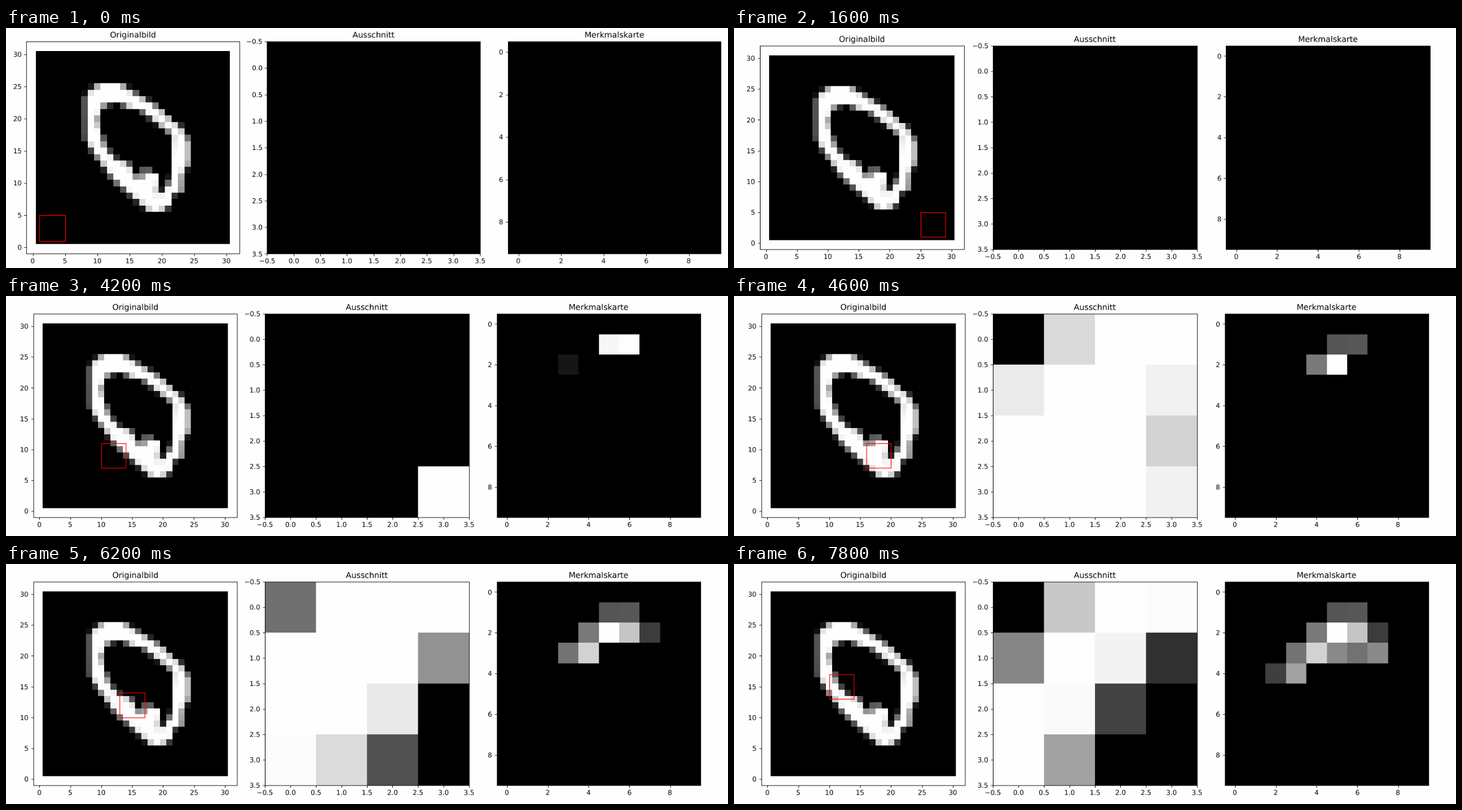
These frames come from a looping animation (1280x427 px, 8 s). An HTML page with a canvas:

```html
<!DOCTYPE html>
<html lang="de">
<head>
<meta charset="utf-8">
<title>Faltung</title>
<style>
html, body { margin: 0; width: 100%; height: 100%; overflow: hidden; background: #fefefe; }
canvas { display: block; }
</style>
</head>
<body>
<canvas id="stage" width="1280" height="427"></canvas>
<script>
const STEP_MS = 200, STEPS = 40;
const SIDE = 30, KERNEL = 4, STRIDE = 3, COLS = 9;
const W = 1500, H = 500, POINT = 100 / 72;

const stage = document.getElementById('stage').getContext('2d');
const sheet = Object.assign(document.createElement('canvas'), { width: W, height: H });
const ctx = sheet.getContext('2d');

// Outline and hole of the digit, y upwards, one unit per image cell.
const DIGIT = new Path2D(
  'M11 26 14 26 15.5 25 20.3 22 22.3 20 23.2 19.5 24.75 17 24.75 13.4 23.7 12 23.6 9' +
  ' 22.3 9 21.9 7 20.2 6 18.7 6 13 11 9.4 16 8.7 17.3 8.67 24 9.4 25Z' +
  'M11.2 22 11.8 22.8 13.8 23 15.8 22.1 17 22 22.1 18 21.9 11 20.6 9 19.8 8.8 20.1 11.9' +
  ' 19 12 18 12.8 17.3 12.2 17.5 11.2 16.9 11 15.2 13.8 13.6 14.1 11.8 16 10.9 19 10.6 20.5Z');

// The antialiasing of a tiny canvas turns the outline into grey cells.
function rasterise(path) {
  const tiny = Object.assign(document.createElement('canvas'), { width: SIDE + 1, height: SIDE + 1 });
  const c = tiny.getContext('2d');
  c.setTransform(1, 0, 0, -1, 0, SIDE + 1);
  c.fill(path, 'evenodd');
  const { data } = c.getImageData(0, 0, SIDE + 1, SIDE + 1);
  return (x, y) => data[((SIDE - y) * (SIDE + 1) + x) * 4 + 3] / 255;
}

const pixel = rasterise(DIGIT);

const range = (from, to, by = 1) =>
  Array.from({ length: Math.round((to - from) / by) + 1 }, (_, i) => from + i * by);

const corner = step => ({
  x: 1 + STRIDE * (step % COLS),
  y: 1 + STRIDE * Math.floor(step / COLS)
});

function cropAt(step) {
  const { x, y } = corner(step);
  return range(0, KERNEL ** 2 - 1).map(i => pixel(x + i % KERNEL, y + Math.floor(i / KERNEL)));
}

const means = range(0, STEPS - 1).map(step => cropAt(step).reduce((a, b) => a + b) / KERNEL ** 2);

// Repeated tight fitting of three square plots; settles over the first steps.
function layout(step) {
  const pad = 10.8 * POINT;
  let insetX = 0, insetY = 12.7, left, top, gap, cell, size;
  for (let n = 0; n <= step; n++) {
    top = 37.3 - insetY;
    const height = H - top - (38.9 - insetY);
    left = pad + Math.max(0, 27.2 - insetX);
    gap = 57.7 - 2 * insetX;
    cell = (W - left - pad - 2 * gap) / 3;
    size = Math.min(cell, height);
    insetX = (cell - size) / 2;
    insetY = (height - size) / 2;
  }
  return [0, 1, 2].map(i => ({ x: left + insetX + i * (cell + gap), y: top + insetY, size }));
}

// Maps data coordinates to the sheet; `up` lets y grow upwards.
function scales(box, min, max, up) {
  const k = box.size / (max - min);
  return {
    x: v => box.x + (v - min) * k,
    y: v => box.y + (up ? max - v : v - min) * k
  };
}

const snap = v => Math.round(v) + 0.5;

function text(str, x, y, points, anchor) {
  ctx.font = `${points * POINT}px "DejaVu Sans", sans-serif`;
  ctx.textRendering = 'geometricPrecision';
  ctx.fillStyle = '#000';
  ctx.fillText(str, Math.round(x - ctx.measureText(str).width * anchor), Math.round(y));
}

function frame(color, points, x0, y0, x1, y1) {
  ctx.strokeStyle = color;
  ctx.lineWidth = points * POINT;
  ctx.strokeRect(snap(x0), snap(y0), snap(x1) - snap(x0), snap(y1) - snap(y0));
}

function fill(s, x0, y0, x1, y1, value) {
  const [l, r] = [s.x(x0), s.x(x1)].map(Math.round);
  const [t, b] = [s.y(y0), s.y(y1)].map(Math.round);
  const grey = Math.round(254 * value);
  ctx.fillStyle = `rgb(${grey},${grey},${grey})`;
  ctx.fillRect(l, t, r - l, b - t);
}

function grid(s, n, offset, valueAt) {
  const cells = range(offset, offset + n - 1);
  fill(s, offset - 0.5, offset - 0.5, offset + n - 0.5, offset + n - 0.5, 0);
  for (const y of cells) {
    for (const x of cells) {
      const value = valueAt(x, y);
      if (value > 0.06) fill(s, x - 0.5, y - 0.5, x + 0.5, y + 0.5, value);
    }
  }
}

function axes(box, s, title, ticks, digits) {
  const right = box.x + box.size, bottom = box.y + box.size, tick = 3.5 * POINT;
  frame('#000', 0.8, box.x, box.y, right, bottom);
  ctx.beginPath();
  for (const v of ticks) {
    const x = s.x(v), y = s.y(v);
    const label = v.toFixed(digits).replace('-', '\u2212');
    ctx.moveTo(snap(x), snap(bottom));
    ctx.lineTo(snap(x), snap(bottom) + tick);
    ctx.moveTo(snap(box.x), snap(y));
    ctx.lineTo(snap(box.x) - tick, snap(y));
    text(label, x, bottom + 2 * tick + 10.2, 10, 0.5);
    text(label, box.x - 2 * tick, y + 5.1, 10, 1);
  }
  ctx.stroke();
  text(title, box.x + box.size / 2, box.y - 6 * POINT, 12, 0.5);
}

function draw(step) {
  const [imageBox, cropBox, mapBox] = layout(step);
  ctx.fillStyle = '#fefefe';
  ctx.fillRect(0, 0, W, H);

  const { x, y } = corner(step);
  let s = scales(imageBox, -1, 32, true);
  grid(s, SIDE, 1, pixel);
  frame('#f00', 1, s.x(x), s.y(y + KERNEL), s.x(x + KERNEL), s.y(y));
  axes(imageBox, s, 'Originalbild', range(0, 30, 5), 0);

  // Crop and map are each stretched to their own value range.
  const crop = cropAt(step);
  const low = Math.min(...crop), span = Math.max(...crop) - low || 1;
  s = scales(cropBox, -0.5, KERNEL - 0.5);
  grid(s, KERNEL, 0, (col, row) => (crop[row * KERNEL + col] - low) / span);
  axes(cropBox, s, 'Ausschnitt', range(-0.5, 3.5, 0.5), 1);

  const seen = means.slice(0, step + 1);
  const peak = Math.max(...seen) || 1;
  s = scales(mapBox, -0.5, 9.5);
  grid(s, 10, 0, (col, row) => col < COLS ? (seen[row * COLS + col] || 0) / peak : 0);
  axes(mapBox, s, 'Merkmalskarte', range(0, 8, 2), 0);

  stage.imageSmoothingQuality = 'high';
  stage.drawImage(sheet, 0, 0, stage.canvas.width, stage.canvas.height);
}

let shown = -1;
function tick() {
  const step = Math.floor(performance.now() / STEP_MS) % STEPS;
  if (step !== shown) draw(shown = step);
  requestAnimationFrame(tick);
}
tick();
</script>
</body>
</html>
```
